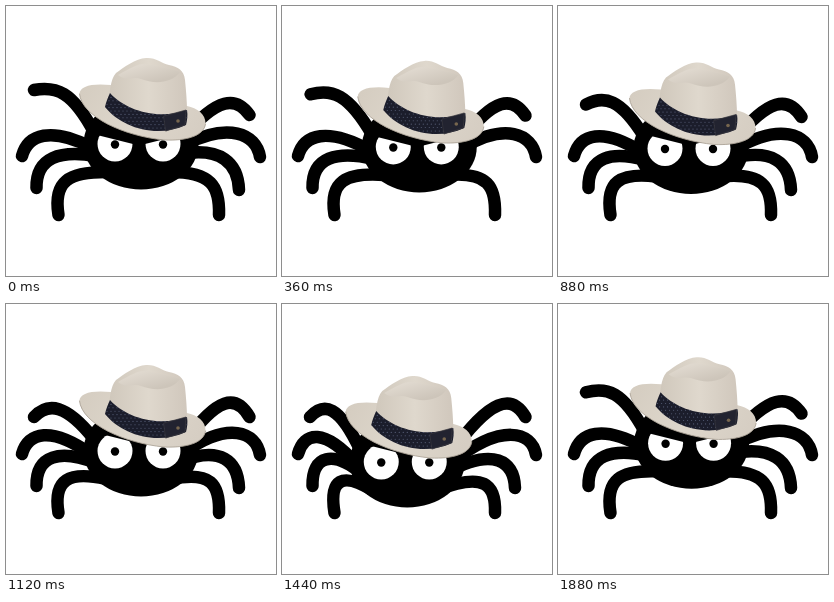
An HTML page with a canvas that plays this animation: 270 by 270 pixels, repeating every 1920 ms.

```html
<!DOCTYPE html>
<html lang="en">
<head>
<meta charset="utf-8">
<title>Dancing spider</title>
<style>
html, body { margin: 0; width: 100%; height: 100%; overflow: hidden; background: #fff; }
canvas { display: block; width: 270px; height: 270px; }
</style>
</head>
<body>
<canvas id="stage"></canvas>
<script>
const LOOP = 1920, STEP = 40, BEAT = 320, TAU = Math.PI * 2;
const canvas = document.getElementById('stage');
const ctx = canvas.getContext('2d');
const ratio = window.devicePixelRatio || 1;
canvas.width = canvas.height = 270 * ratio;

// Smooth rise and fall between two moments
function bump(t, start, length) {
  const u = (t - start) / length;
  return u > 0 && u < 1 ? Math.sin(Math.PI * u) ** 2 : 0;
}

function poseAt(t) {
  const angle = TAU * t / BEAT;
  const lift = Math.cos(angle);
  const sway = 13 * (bump(t, 320, 480) - bump(t, 1280, 480));
  const dip = 11 * (bump(t, 320, 320) + bump(t, 1280, 320));
  return {
    beat: Math.floor(t / BEAT), lift, sway,
    x: 2 * Math.sin(angle) + sway,
    y: 4.5 * (1 - lift) + dip
  };
}

// The foot stays put while the hip follows the body
function leg(tip, a, b, hip, p) {
  ctx.beginPath();
  ctx.moveTo(...tip);
  ctx.bezierCurveTo(...a, b[0] + p.x * 0.3, b[1] + p.y * 0.1, hip[0] + p.x, hip[1] + p.y);
  ctx.stroke();
}

function drawLegs(p) {
  const c = p.lift, s = Math.max(0, p.sway) * 0.75, d = 2 * (1 - c);
  ctx.strokeStyle = '#000';
  ctx.lineWidth = 12.5;
  ctx.lineCap = 'round';
  leg([28 + s, 98.5 - 14.5 * c], [46 + 4 * c + s, 89 - 9 * c], [63 + 3 * c + s * 0.5, 92 - 7 * c], [88, 126], p);
  leg([16, 150], [22, 128], [45, 121], [85, 141], p);
  leg([30.5, 182], [30, 151], [54, 144], [90, 150], p);
  leg([52.5, 209], [47, 175], [63, 166], [100, 166], p);
  leg([243.5, 109 + d], [230, 90], [212, 91], [178, 130], p);
  leg([254, 151], [250, 127], [222, 117], [180, 138], p);
  // One leg is tucked away during the step to the right
  if (p.beat !== 1) leg([233, 184], [232, 157], [215, 141], [175, 148], p);
  leg([213, 209], [214, 180], [205, 166], [165, 166], p);
}

function disc(x, y, r, color) {
  ctx.fillStyle = color;
  ctx.beginPath();
  ctx.arc(x, y, r, 0, TAU);
  ctx.fill();
}

// side is -1 for the left eye, 1 for the right
function drawEye(x, y, side, lift) {
  const lid = y - 9.5 + 4.5 * lift;
  ctx.save();
  ctx.beginPath();
  ctx.moveTo(x - 24, lid + side * 6);
  ctx.lineTo(x + 24, lid - side * 6);
  ctx.lineTo(x + 24, y + 24);
  ctx.lineTo(x - 24, y + 24);
  ctx.clip();
  disc(x, y - 0.5, 17.5, '#fff');
  ctx.restore();
  disc(x, y, 4.2, '#000');
}

function drawBody(p) {
  ctx.fillStyle = '#000';
  ctx.beginPath();
  ctx.ellipse(135, 138, 57.5, 45.5, 0, 0, TAU);
  ctx.fill();
  drawEye(109, 138.5, -1, p.lift);
  drawEye(157, 138.5, 1, p.lift);
}

function shade(x0, y0, x1, y1, ...colors) {
  const g = ctx.createLinearGradient(x0, y0, x1, y1);
  colors.forEach((color, i) => g.addColorStop(i / (colors.length - 1), color));
  return g;
}

const brim = new Path2D('M73.5 88 C73.5 80 86 77 105 79 L181 100 C191 102 200 108 199.5 118 ' +
  'C198 130 180 135 158 134 C118 130 76 111 73.5 88 Z');
const rim = new Path2D('M73.5 88 C76 111 118 130 158 134 C180 135 198 130 199.5 118');
const crown = new Path2D('M102 98 C104 86 104 74 110 67 C117 62 130 52 140 52 ' +
  'C149 51 155 57 163 59 C172 61 178 64 179 74 C180 84 181 95 181 106 C155 121 120 115 102 98 Z');
const dent = new Path2D('M112 69 C125 62 133 57 141 58 C150 60 162 62 174 66 ' +
  'C165 78 148 78 135 73 C127 70 120 76 112 69 Z');
const band = new Path2D('M104 87 C118 103 150 115 181 104 C182 109 181 115 180 119 ' +
  'C150 133 115 121 99 101 C100 96 102 91 104 87 Z');
const bow = new Path2D('M158 110 L180 104 L179 119 L160 125 Z');

function drawHat() {
  ctx.fillStyle = shade(80, 78, 185, 136, '#d5cdc1', '#ded7cc', '#d6cec3');
  ctx.fill(brim);
  ctx.strokeStyle = '#aca397';
  ctx.lineWidth = 0.9;
  ctx.stroke(rim);
  ctx.fillStyle = shade(104, 85, 181, 85, '#d0c8bc', '#dfd8cd', '#d0c7bc');
  ctx.fill(crown);
  ctx.fillStyle = shade(140, 58, 145, 77, '#dfd8ce', '#cdc5ba');
  ctx.fill(dent);
  ctx.fillStyle = '#1b1d2b';
  ctx.fill(band);
  ctx.save();
  ctx.clip(band);
  for (let row = 0; row < 13; row++) {
    for (let col = 0; col < 21; col++) {
      disc(99 + col * 4 + row % 2 * 2, 88 + row * 3.4, 0.55, '#596079');
    }
  }
  ctx.restore();
  ctx.fillStyle = '#222330';
  ctx.fill(bow);
  ctx.strokeStyle = '#3b3a40';
  ctx.lineWidth = 0.7;
  ctx.stroke(bow);
  disc(172, 115, 1.8, '#77664e');
}

function draw(now) {
  const t = Math.floor(now % LOOP / STEP) * STEP;
  const p = poseAt(t);
  ctx.setTransform(ratio, 0, 0, ratio, 0, 0);
  ctx.fillStyle = '#fff';
  ctx.fillRect(0, 0, 270, 270);
  drawLegs(p);
  ctx.translate(p.x, p.y);
  drawBody(p);
  drawHat();
}

const start = performance.now();
function tick() {
  draw(performance.now() - start);
  requestAnimationFrame(tick);
}
tick();
</script>
</body>
</html>
```
